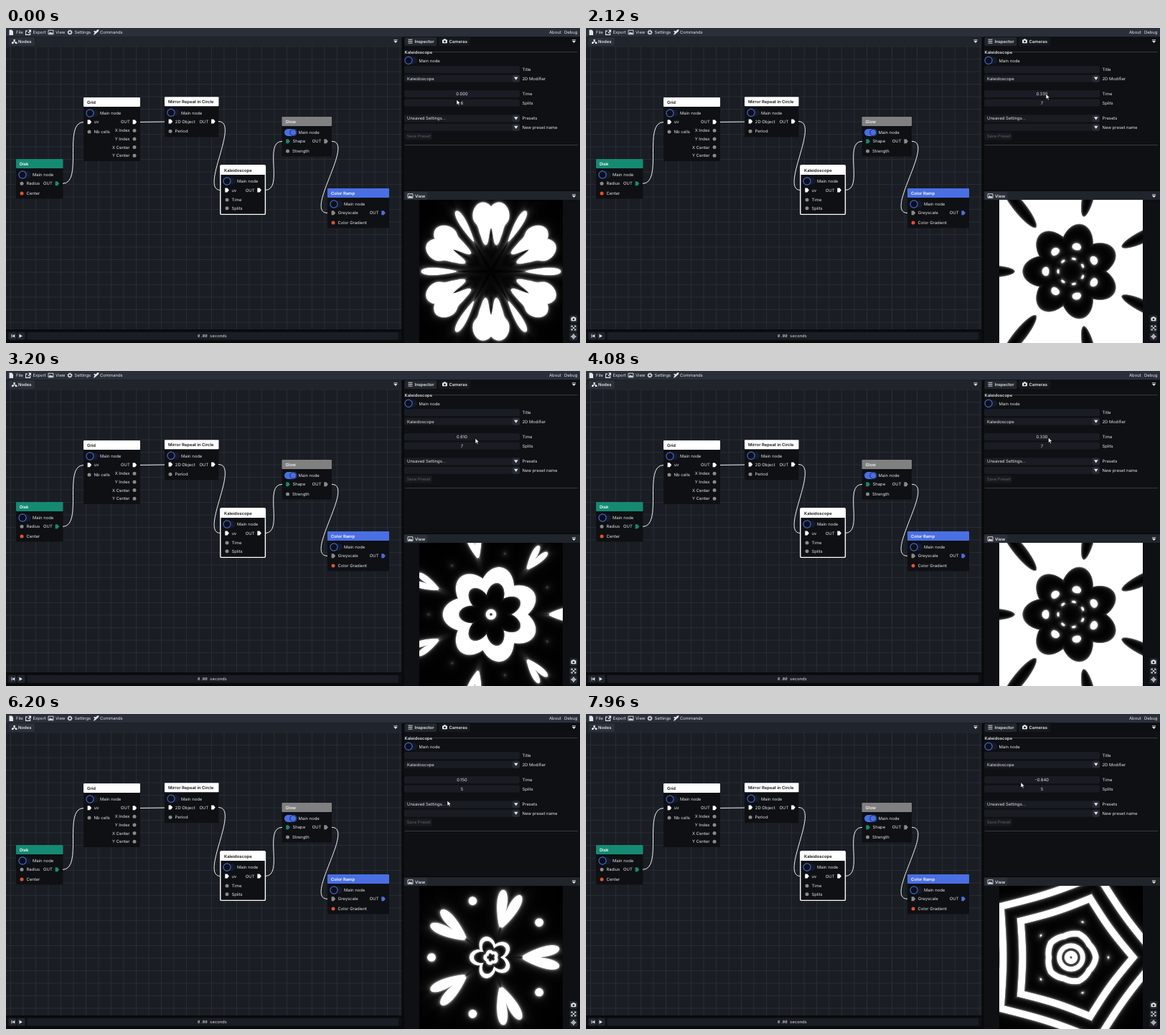
These frames come from a looping animation (800 by 440 pixels, 8 s). An HTML page with a canvas:

```html
<!DOCTYPE html>
<html lang="en">
<head>
<meta charset="utf-8">
<title>Node editor</title>
<style>
html, body { margin: 0; width: 800px; height: 440px; overflow: hidden; background: #08090b; }
svg, canvas { position: absolute; left: 0; top: 0; display: block; }
#view { left: 576px; top: 240px; }
text { font: 5.9px Inter, "Open Sans", sans-serif; fill: #e4e6ea; white-space: pre; text-rendering: geometricPrecision; }
.b { font-weight: 600; }
.mid { text-anchor: middle; }
.end { text-anchor: end; }
.mono { font: 5.7px "Noto Sans Mono", "DejaVu Sans Mono", monospace; }
</style>
</head>
<body>
<svg id="ui" width="800" height="440"></svg>
<canvas id="view" width="200" height="200"></canvas>
<svg id="top" width="800" height="440"></svg>
<script>
const BLUE = '#4a6fe3', GREEN = '#158a72', GREY = '#8a8a8a', RED = '#e5502e';
const BAR = '#20242b', TAB = '#2b3039', PANEL = '#0e1013';

// ---------- interface ----------
const rect = (x, y, w, h, fill, rx = 0, more = '') =>
  `<rect x="${x}" y="${y}" width="${w}" height="${h}" rx="${rx}" fill="${fill}" ${more}/>`;
const text = (x, y, s, cls = '', more = '') =>
  `<text x="${x}" y="${y + 2.1}" class="${cls}" ${more}>${s}</text>`;
const path = (d, fill = '#e4e6ea', stroke = 'none', w = 1) =>
  `<path d="${d}" fill="${fill}" stroke="${stroke}" stroke-width="${w}" stroke-linejoin="round"/>`;
const dot = (x, y, fill = GREY, r = 2.5) => `<circle cx="${x}" cy="${y}" r="${r}" fill="${fill}"/>`;
const arrow = (x, y, fill = '#fff') => path(`M${x - 2.7} ${y - 3}h3.2l2.4 3l-2.4 3h-3.2z`, fill);
const down = (x, y) => path(`M${x - 2.8} ${y - 2}h5.6l-2.8 4.2z`);
const menuMark = (x, y) => rect(x - 2.6, y - 2.2, 5.2, .9, '#e4e6ea') + path(`M${x - 2.6} ${y - .4}h5.2l-2.6 3z`);
const toggle = (x, y, on) => on
  ? rect(x - 5.5, y - 5, 17.5, 10, BLUE, 5) +
    `<circle cx="${x + 6.7}" cy="${y}" r="4.4" fill="${BLUE}" stroke="#16203c" stroke-width=".9"/>`
  : rect(x - 5, y - 5, 17, 10, '#131a2a', 5) +
    `<circle cx="${x}" cy="${y}" r="5.1" fill="#0d1017" stroke="#4666d0" stroke-width="1.2"/>`;

function node(x, y, w, h, title, head, ink, on, body) {
  const mid = y + 22;
  return rect(x, y, w, h, PANEL, 1.5) +
    rect(x, y, w, 13, head, 1) +
    text(x + 5, y + 7, title, 'b', `style="fill:${ink}"`) +
    toggle(x + 9, mid, on) + text(x + 23, mid + .2, 'Main node') + body;
}
const input = (x, y, label, pin) => pin + text(x + 6.5, y, label);
const output = (x, y, label, pin) => pin + text(x - 6.5, y, label, 'end');
const pinIn = (x, y, label, c) => input(x, y, label, dot(x, y, c));
const flowIn = (x, y, label, c) => input(x, y, label, arrow(x, y, c));
const pinOut = (x, y, label, c) => output(x, y, label, dot(x, y, c));
const flowOut = (x, y, c) => output(x, y, 'OUT', arrow(x, y, c));
const link = d => path(d, 'none', '#f2f2f2', 1);

const gear = (x, y) => `<circle cx="${x}" cy="${y}" r="2.2" fill="none" stroke="#e4e6ea" stroke-width="1.3"/>` +
  `<circle cx="${x}" cy="${y}" r="3.1" fill="none" stroke="#e4e6ea" stroke-width="1" stroke-dasharray="1.2 1.23"/>`;
const camera = (x, y) => rect(x - 3.5, y - 2.2, 7, 5, '#e4e6ea', 1) + rect(x - 1.5, y - 3.2, 3, 2, '#e4e6ea') + dot(x, y + .3, '#17191e', 1.4);
const image = (x, y) => path(`M${x - 3.5} ${y - 2.8}h7v5.6h-7z`, 'none', '#e4e6ea', .9) + path(`M${x - 3} ${y + 2.3}l2-3l1.5 1.8l1-1.2l1.7 2.4z`);
const field = (x, y, w) => rect(x, y - 5, w, 10, '#191c22', 2.5);
const combo = y => field(555, y, 161) + rect(705.5, y - 5, 10.5, 10, '#272b34', 2) + down(710.8, y);

const chrome = [
  rect(0, 0, 800, 440, '#08090b'),
  rect(0, 0, 800, 12.5, '#2a2f39'),
  path('M4.5 2.5h3.5l2 2v5.5h-5.5z'), text(14, 6, 'File'),
  path('M27 3.5h3v1.2h-2v4h5v-2h1.2v3.2h-7.2zM31 2.5h4v4l-1.3-1.3l-2.2 2.2l-1-1l2.2-2.2z'), text(37.5, 6, 'Export'),
  image(62.5, 6), text(69, 6, 'View'),
  gear(89, 6), text(95.5, 6, 'Settings'),
  path('M122 10l1-3l4-4.5l2.5-.5l-.5 2.5l-4.5 4zM122 4.5l2-.8l1 1l-1.5 1.5z'), text(131, 6, 'Commands'),
  text(757, 6, 'About'), text(778, 6, 'Debug'),

  rect(0, 12.5, 551.5, 12.5, BAR), rect(4, 13, 36, 12, TAB, 2),
  path('M10.3 16h2.6v2h-2.6zM8 20h2.6v2h-2.6zM12.8 20h2.6v2h-2.6zM11.2 18h.8v1h2.4v1h-5.6v-1h2.4z'),
  text(17, 18.8, 'Nodes', 'b'), menuMark(543, 18.5),
  rect(0, 25, 551.5, 396, '#1a1e24'), rect(0, 25, 551.5, 396, 'url(#grid)'),

  rect(0, 423.5, 551.5, 13, PANEL),
  rect(3.5, 425, 11, 10.5, '#22262e', 2), path('M12.2 427.8v4.8l-3.4-2.4zM7.6 427.8h1v4.8h-1z'),
  rect(15.5, 425, 11, 10.5, '#22262e', 2), path('M18.5 427.6l4.4 2.6l-4.4 2.6z'),
  rect(29.5, 425, 517.5, 10.5, '#1a1d23', 2), text(287.5, 430.2, '0.00 seconds', 'mono mid'),

  rect(554.5, 12.5, 245.5, 214, PANEL), rect(554.5, 12.5, 245.5, 12.5, '#0d0f12'),
  rect(555.5, 13, 45, 12, '#22262d', 2), rect(603, 13, 44, 12, '#15181d', 2),
  path('M560.5 16.2h6M560.5 18.6h6M560.5 21h6', 'none', '#e4e6ea', 1), text(569.5, 18.8, 'Inspector', 'b'),
  camera(611.5, 18.5), text(617.5, 18.8, 'Cameras', 'b'), menuMark(791.5, 18.5),
  text(555.5, 33.5, 'Kaleidoscope', 'b'), rect(594.5, 33, 202, 1, '#353941'),
  toggle(561, 45.3), text(575.5, 45.5, 'Main node'),
  field(555, 58, 161), text(719.5, 58, 'Title'),
  combo(70.5), text(559, 70.5, 'Kaleidoscope'), text(719.5, 70.5, '2D Modifier'),
  field(555, 92, 161), text(719.5, 92, 'Time'),
  field(555, 104.5, 161), text(719.5, 104.5, 'Splits'),
  combo(126.3), text(559, 126.3, 'Unsaved Settings...'), text(719.5, 126.3, 'Presets'),
  combo(138.8), text(719.5, 138.8, 'New preset name'),
  rect(555, 146, 39, 10.5, '#16191e', 2.5), text(558.5, 151.3, 'Save Preset', '', 'opacity=".35"'),
  rect(555.5, 163, 241.5, 1, '#353941'),

  rect(554.5, 228, 245.5, 12.3, BAR), rect(555.5, 228.5, 32, 11.8, TAB, 2),
  image(563.5, 234.5), text(570, 234.5, 'View', 'b'), menuMark(791.5, 234.5),
  rect(554.5, 240.3, 245.5, 199.7, PANEL),
  [406.5, 419, 431].map(y => rect(785.5, y - 5.5, 11, 11, '#22262e', 2)).join(''),
  camera(791, 406.5),
  path('M788 418v-2h2M792 416h2v2M794 420v2h-2M790 422h-2v-2M788 416l6 6M794 416l-6 6', 'none', '#e4e6ea', .9),
  `<circle cx="791" cy="431" r="2.2" fill="none" stroke="#e4e6ea"/>`,
  path('M791 427v8M787 431h8', 'none', '#e4e6ea', .9)
];

const graph = [
  node(14, 183, 65.5, 55.5, 'Disk', GREEN, '#fff', false,
    pinIn(22, 217.3, 'Radius') + flowOut(71.3, 217.3, GREEN) + pinIn(22, 231, 'Center', RED)),
  node(108, 97, 79, 89, 'Grid', '#fff', '#111', false,
    flowIn(116.3, 131.3, 'uv') + flowOut(179.3, 131.3) + pinIn(116, 145, 'Nb cells') +
    ['X Index', 'Y Index', 'X Center', 'Y Center'].map((s, i) => pinOut(179, 143.2 + i * 11.7, s)).join('')),
  node(221, 96.3, 75.5, 56, 'Mirror Repeat in Circle', '#fff', '#111', false,
    flowIn(229.3, 130.5, '2D Object') + flowOut(288.8, 130.5) + pinIn(229, 144.2, 'Period')),
  node(299, 192, 62.5, 68.5, 'Kaleidoscope', '#fff', '#111', false,
    flowIn(308, 226.5, 'uv') + flowOut(353, 226.5) + pinIn(308, 240, 'Time') + pinIn(308, 251.7, 'Splits')),
  rect(298.8, 191.8, 62.6, 68.6, 'none', 1.5, 'stroke="#fff" stroke-width="1.4"'),
  node(384.5, 124, 69.5, 55.5, 'Glow', '#808080', '#f0f0f0', true,
    flowIn(393, 158.3, 'Shape', GREEN) + flowOut(446, 158.3, GREY) + pinIn(392.5, 172, 'Strength')),
  node(448, 224, 86, 55.5, 'Color Ramp', BLUE, '#fff', false,
    flowIn(456.3, 258.3, 'Greyscale', GREY) + flowOut(526, 258.3, BLUE) + pinIn(456, 272, 'Color Gradient', RED)),
  link('M79 217.3C108 217.3 79 131.5 108 131.5'),
  link('M187 131.4L221 131'),
  link('M296 130.5C327 130.5 269 226.5 299 226.5'),
  link('M361 226.5C388 226.5 358 158.3 385 158.3'),
  link('M454 158.3C487 158.3 415 258.3 448 258.3')
];

ui.innerHTML = `<defs><pattern id="grid" width="17.5" height="17.5" patternUnits="userSpaceOnUse" x="6" y="8">
  <path d="M.5 0V17.5M0 .5H17.5" stroke="#2a2f37" stroke-width=".8"/></pattern></defs>` +
  chrome.join('') + graph.join('');
document.getElementById('top').innerHTML =
  text(635.5, 92, '', 'mid', 'id="time"') + text(635.5, 104.5, '', 'mid', 'id="splits"') +
  `<path id="cursor" d="M0 0V7.4L1.8 5.8L3 8.4L4.2 7.9L3.1 5.3H5.4Z" fill="#fff" stroke="#000" stroke-width=".6"/>`;
const [timeText, splitsText, cursor] = ['time', 'splits', 'cursor'].map(id => document.getElementById(id));

// ---------- kaleidoscope ----------
// r: distance from the centre, a: 0..1 across half a split.
// Shapes give a rough signed distance; coordinates are (along, across) an axis.
function blob(x, y, cx, cy, len, wid, tilt = 0, taper = 0) {
  const c = Math.cos(tilt), s = Math.sin(tilt), dx = x - cx, dy = y - cy;
  const u = (dx * c + dy * s) / len;
  const w = wid * (1 + taper * Math.max(-1, Math.min(1, u)));
  const v = (dy * c - dx * s) / w;
  const k = Math.hypot(u, v);
  return k * (k - 1) / (Math.hypot(u / len, v / w) + 1e-6);
}
const ring = (r, R, w) => Math.abs(r - R) - w;
const bulge = a => Math.sin(a * Math.PI / 2);
const min = Math.min, max = Math.max;
function merge(p, q, k = .06) {
  const h = max(0, k - Math.abs(p - q)) / k;
  return min(p, q) - h * h * k / 4;
}
// Straight-sided pentagon, sides slightly pulled in; R is the corner radius.
function pentagon(r, a, R, w) {
  const side = r * Math.cos(Math.PI / 5 * (1 - a));
  return Math.abs(side + .035 * bulge(a) * r - R * .81) - w;
}

const looks = [
  [-.84, (r, a) => min(
    ring(r, .053, .034),
    ring(r, .163, .03),
    ring(r, .345 - .035 * a, .038),
    pentagon(r, a, .865, .047),
    pentagon(r, a, 1.21, .047),
    blob(r, a * r * .5, .52, 0, .008, .008))],
  [0, (r, a) => {
    const y = a * r * .5, z = (1 - a) * r * .5;
    const head = merge(blob(r, z, .82, .12, .15, .125), blob(r, z, .72, .06, .19, .11));
    const petal = merge(head, blob(r, z, .55, .085, .17, .055, .1, .2));
    const tooth = blob(r, z, .45, 0, .16, .035, 0, -.4);
    return min(blob(r, y, .73, 0, .24, .042, 0, .5), max(petal, -tooth));
  }],
  [.15, (r, a) => {
    const y = a * r * .5, z = (1 - a) * r * .5;
    return min(
      ring(r, .065 + .018 * bulge(a), .019),
      ring(r, .16 + .11 * bulge(a), .026),
      blob(r, y, .7, .055, .26, .05, .18, .4),
      blob(r, z, .83, 0, .055, .042));
  }],
  [.33, (r, a) => {
    const z = (1 - a) * r * .5;
    const heart = .5 + .18 * bulge(a) - r;
    const gap = blob(r, z, 1.16, 0, .38, .1);
    return min(
      blob(r, z, .18, 0, .012, .028),
      blob(r, z, .355, 0, .045, .065),
      max(heart, -gap));
  }],
  [.61, (r, a) => {
    const y = a * r * .5, z = (1 - a) * r * .5;
    return min(
      ring(r, .046, .023),
      ring(r, .4 + .16 * bulge(a), .108),
      blob(r, y, .99, .045, .18, .042, .22, .4),
      blob(r, z, .87, 0, .02, .02) + .03);
  }]
];

const ctx = view.getContext('2d');
const img = ctx.createImageData(200, 200);
const px = new Uint32Array(img.data.buffer);
let drawn = '';

function drawView(t, splits) {
  const key = t + '/' + splits;
  if (key === drawn) return;
  drawn = key;
  let i = 0;
  while (i < looks.length - 2 && t > looks[i + 1][0]) i++;
  const [t0, from] = looks[i], [t1, to] = looks[i + 1];
  const mix = (t - t0) / (t1 - t0), turn = 2 * Math.PI / splits;
  for (let n = 0; n < px.length; n++) {
    const x = (n % 200 - 99.5) / 100, y = (Math.floor(n / 200) - 99.5) / 100;
    const r = Math.hypot(x, y), f = Math.abs(Math.atan2(y, x)) / turn;
    const a = 2 * Math.abs(f - Math.round(f));
    const d = (mix < 1 ? from(r, a) * (1 - mix) : 0) + (mix > 0 ? to(r, a) * mix : 0);
    const g = d > 0 ? (.016 / (.016 + d)) ** 2 : 1;
    px[n] = 0xff000000 | Math.round(255 * g) * 0x010101;
  }
  ctx.putImageData(img, 0, 0);
}

// ---------- motion ----------
const timeKeys = [[0, 0], [1500, 0], [2120, .33], [3200, .61], [3400, .61], [4500, .15], [6800, .15], [7960, -.84]];
const mouseKeys = [[0, 628, 100], [500, 635, 101], [1000, 636, 99.5], [1500, 630, 92], [2120, 641, 92], [3200, 654, 94],
  [3450, 654, 93], [4500, 638, 93], [4880, 653, 110], [5300, 636, 103], [5900, 622, 103], [6200, 615, 121],
  [6750, 640, 95], [7960, 606, 95.5]];

function at(keys, ms) {
  let i = 0;
  while (i < keys.length - 2 && ms > keys[i + 1][0]) i++;
  const a = keys[i], b = keys[i + 1];
  const k = max(0, min(1, (ms - a[0]) / (b[0] - a[0])));
  return a.slice(1).map((v, j) => v + (b[j + 1] - v) * k);
}

const start = performance.now();
function tick(now) {
  const ms = Math.floor(max(0, now - start) % 8000 / 40) * 40;
  const t = Math.round(at(timeKeys, ms)[0] * 100) / 100;
  const splits = ms < 480 ? 6 : ms < 5480 ? 7 : ms < 5800 ? 6 : 5;
  const [x, y] = at(mouseKeys, ms);
  timeText.textContent = t.toFixed(3);
  splitsText.textContent = splits;
  cursor.setAttribute('transform', `translate(${x} ${y})`);
  drawView(t, splits);
  requestAnimationFrame(tick);
}
tick(start);
</script>
</body>
</html>
```
